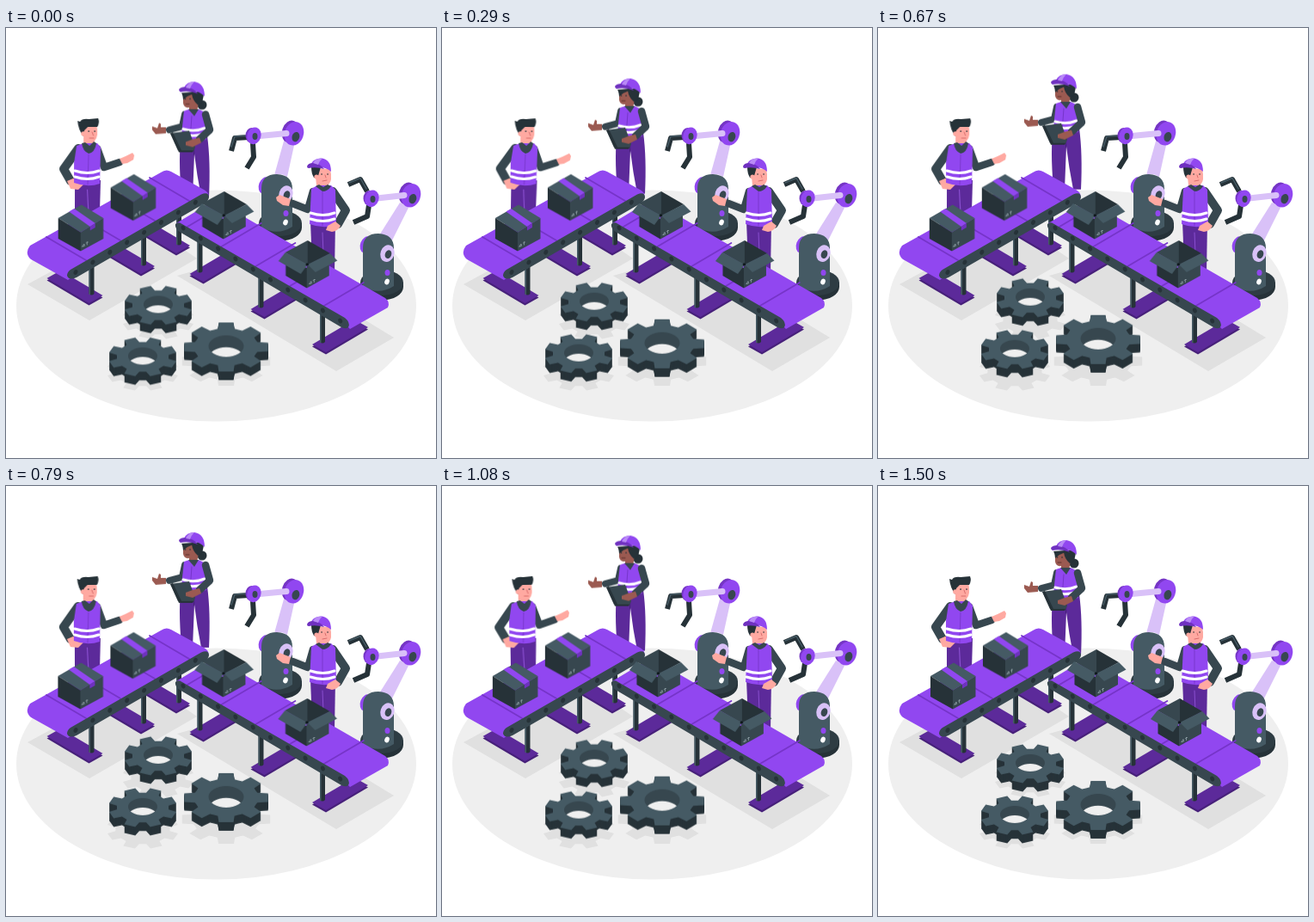
Write an HTML page that moves like this. It is 500x500 px and loops after 1.54 s.

```html
<!DOCTYPE html>
<html lang="en">
<head>
<meta charset="utf-8">
<title>Assembly line</title>
<style>
  html, body { margin: 0; width: 100%; height: 100%; overflow: hidden; background: #fff; }
  svg { display: block; width: 100vw; height: 100vh; }
  .p { fill: #9147f0 } .dp { fill: #5c2a9a } .lp { fill: #d9c1f8 }
  .g { fill: #455a64 } .mg { fill: #37474f } .dg { fill: #263238 }
  .w { fill: #fff } .sh { fill: #e0e0e0 } .skin { fill: #ffa9a1 } .brown { fill: #9b5a51 }
  .line { fill: none; stroke-linecap: round; stroke-linejoin: round }
  .sleeve { stroke: #37474f; stroke-width: 10 }
  .claw { fill: none; stroke: #263238; stroke-width: 6; stroke-linejoin: round }
  .man { transform-origin: 95px 212px }
</style>
</head>
<body>
<svg id="stage" viewBox="0 0 500 500">
  <ellipse cx="244.500" cy="323" rx="232.500" ry="134.500" fill="#efefef"/>
  <path class="sh" d="M25 298L97 340L222 268L160 225ZM199 288L384 399L451 360L290 262Z"/>
  <g id="shadows"></g>

  <!-- supervisor with clipboard -->
  <g class="float">
    <path class="dp" d="M204 126L234 126Q238 155 236 197L227 197Q222 172 219 147L217 197L204 197Q200 148 204 126Z"/>
    <path class="line" d="M219 133L218.500 148" stroke="#47207a" stroke-width="1"/>
    <circle class="dg" cx="228" cy="90" r="5.500"/>
    <path class="dg" d="M204 76L230 74Q230 87 224 92L211 90Z"/>
    <path class="brown" d="M206 77L221 78L224 87L222 98L213 99L213 93Q207 94 206 88Z"/>
    <path class="dg" d="M216 77L229 74L227 88L223 90Q217 85 216 77ZM205 76L218 77L211 80L206 84Z"/>
    <path class="p" d="M207 70Q210 63 219 63Q231 65 231 80Q225 74 218 74Z"/>
    <path d="M201 72Q203 69 209 69Q218 70 223 77Q213 73 203 75Q201 74 201 72Z" fill="#6f31c0"/>
    <path d="M214 64L219 63Q215 67 214 71L209 70Q210 67 214 64Z" fill="#b98af7"/>
    <path class="line" d="M208.500 83h.1M214 83h.1" stroke="#263238" stroke-width="1.600"/>
    <path class="line" d="M209 89L213 89" stroke="#5f302c" stroke-width="1"/>
    <path class="line sleeve" d="M208 101L205 115L190 119" style="stroke-width:8"/>
    <path class="p" d="M207 97L213 95L224 95L232 99L233 130Q219 136 204 131L205 115Z"/>
    <path class="mg" d="M212 95L224 95L219 103Z"/>
    <path class="line" d="M216 103L214 131" stroke="#6f31c0" stroke-width=".8"/>
    <path class="line" d="M206 118Q219 122 231 117M206 124Q219 128 231 123" stroke="#fff" stroke-width="3"/>
    <path class="mg" d="M191 123L213 120L220 139L218 144L200 143Z"/>
    <path class="dg" d="M191 123L194 122L204 143L218 143L217 145L201 145Z"/>
    <path class="line sleeve" d="M232 101L237 119L225 130" style="stroke-width:8.500"/>
    <path class="brown" d="M225 128L227 134L217 139L209 137L209 133L217 130Z"/>
    <path class="brown" d="M186 116L186 123L174 124L170 119L170 115L176 117L178 111L180 112L180 116Z"/>
  </g>

  <!-- worker by the closed boxes -->
  <g class="man">
    <path class="dp" d="M80 177L110 177L109 214L96 225L80 216Z"/>
    <path class="line" d="M94.500 188L96 216" stroke="#8a4fd0" stroke-width="1.200"/>
    <path class="line sleeve" d="M84 140L67 164L75 178"/>
    <path class="line sleeve" d="M106 140L114 162L132 156" style="stroke-width:8.500"/>
    <path class="skin" d="M71 178L78 175Q86 177 90 182L84 188L75 187Z"/>
    <path class="skin" d="M132 152L139 149L147 145L149 148L148 153L141 157L135 158Z"/>
    <path class="skin" d="M90 114L105 112Q108 126 103 131L102 138L94 141L90 134Z"/>
    <path class="p" d="M82 137L90 134L106 134L110 139L109 181Q95 186 79 180L79 157Z"/>
    <path class="mg" d="M88 134L92 133L97 137L102 132L105 134Q103 145 96 146Q89 143 88 134Z"/>
    <path class="line" d="M96 147L95 182" stroke="#7535c5" stroke-width=".8"/>
    <path class="line" d="M80 166Q95 171 108 166M80 173Q95 178 108 173" stroke="#fff" stroke-width="3"/>
    <path class="dg" d="M83 108L86 109Q88 105 96 106L107 105Q109 110 106 115L95 115L91 119L90 126Q84 119 83 108Z"/>
    <circle class="skin" cx="90" cy="123" r="2.800"/>
    <path class="line" d="M96 120h.1M103 120h.1" stroke="#263238" stroke-width="1.700"/>
    <path class="line" d="M100 121L101.500 125M97 128L102 128" stroke="#d96e6d" stroke-width="1"/>
  </g>

  <defs>
    <g id="base">
      <path class="dg" d="M294 227V232A25 15.500 0 0 0 344 232V227Z"/>
      <ellipse cx="319" cy="227" rx="25" ry="15" fill="#2e3c43"/>
      <ellipse class="p" cx="301" cy="183" rx="7" ry="10" transform="rotate(20 301 183)"/>
      <path class="g" d="M297 187Q297 170 315 170Q333 171 333 187V231Q316 242 297 232Z"/>
      <ellipse class="lp" cx="325.500" cy="193" rx="8" ry="10" transform="rotate(20 325 193)"/>
      <ellipse class="mg" cx="326.500" cy="194" rx="3.700" ry="5" transform="rotate(20 326 194)"/>
      <ellipse class="p" cx="325.500" cy="215.500" rx="3" ry="3.600"/>
      <ellipse class="w" cx="325" cy="226" rx="2.700" ry="3.500" transform="rotate(20 325 226)"/>
    </g>
    <g id="elbow">
      <ellipse cx="-4" cy="-1" rx="9.500" ry="13" transform="rotate(18)" fill="#7535c5"/>
      <ellipse class="p" cx="1" rx="11" ry="14" transform="rotate(18)"/>
      <ellipse class="mg" cx="4" cy="3" rx="4.300" ry="5.800" transform="rotate(18)"/>
    </g>
    <g id="wrist">
      <ellipse cx="-2" rx="7" ry="9" fill="#7535c5"/>
      <ellipse class="p" cx="1" rx="8" ry="10" transform="rotate(18)"/>
      <ellipse class="mg" cx="2" cy="1" rx="3" ry="4"/>
    </g>
    <g id="sealed">
      <path class="g" d="M88 205.500L113.500 221L87 237.500L61 221Z"/>
      <path class="dg" d="M61 221L87 237.500V259.500L61 245Z"/>
      <path class="mg" d="M87 237.500L113.500 221V245L87 259.500Z"/>
      <path class="p" d="M73.500 213.500L79.500 210L104 227L98 231Z"/>
      <path d="M98 231L104 227V232L98 235.500Z" fill="#6f31c0"/>
      <use href="#marks" x="89" y="255"/>
    </g>
    <g id="open">
      <path class="dg" d="M228.500 212L253 222V245.500L228.500 231Z"/>
      <path class="mg" d="M253 220L279 211V231L253 245.500Z"/>
      <path class="mg" d="M228 204L254 190L254 219Z"/>
      <path class="dg" d="M254 190L280 205L254 219Z"/>
      <path class="g" d="M228 204L254 218L246 229L220 214Z"/>
      <path class="g" d="M280 205L254 218L263 227L288.500 213.500Z"/>
      <circle cx="253.500" cy="218" r="1.800" fill="#111a1e"/>
      <use href="#marks" x="256" y="241.500"/>
    </g>
    <path id="marks" class="line" d="M0 -1L2 -4L2.500 -2ZM5.500 -3V-6M4.500 -5L5.500 -6L6.500 -6" stroke="#9fb0b7" stroke-width=".7"/>
  </defs>

  <!-- robot arms -->
  <g>
    <path class="lp" d="M312 171L324 128L336 132L327 173Q320 168 312 171Z"/>
    <use href="#base"/>
    <use href="#elbow" x="334" y="122.500"/>
    <path class="line" d="M290 126L326 122.500" stroke="#d9c1f8" stroke-width="7"/>
    <path class="claw" d="M283 127L266 128L262 143M287 134L288 150L280 163"/>
    <path class="line" d="M282 125L266 126L262 138" stroke="#455a64" stroke-width="1.500"/>
    <use href="#wrist" x="287.500" y="125"/>
  </g>
  <g>
    <path class="lp" d="M434 241L458 203L469 207L449 247Z"/>
    <use href="#base" x="118" y="69"/>
    <use href="#elbow" x="470" y="194.500"/>
    <path class="line" d="M427 198.500L463 194.500" stroke="#d9c1f8" stroke-width="7"/>
    <path class="claw" d="M420 190L412 176L398 182M422 206L420 219L404 226"/>
    <path class="line" d="M419 187L412 174.500L399 180" stroke="#455a64" stroke-width="1.500"/>
    <use href="#wrist" x="424.500" y="198"/>
  </g>

  <!-- worker by the open boxes -->
  <g>
    <path class="dp" d="M354 225L383 225L382 285L356 275Z"/>
    <path class="line" d="M368 238L369 262" stroke="#8a4fd0" stroke-width="1"/>
    <path class="line sleeve" d="M357 190L351 211L333 204" style="stroke-width:8.500"/>
    <path class="line sleeve" d="M380 190L395 212L386 228"/>
    <path class="skin" d="M331 199L329 207L322 206L315 201L314 197L318 194Z"/>
    <path class="skin" d="M359 163L377 164Q380 178 375 182L374 188L366 189L361 183Z"/>
    <path class="p" d="M355 187L362 183L378 183L383 188L384 229Q369 234 353 228L354 207Z"/>
    <path class="mg" d="M360 184L364 182L369 185L374 182L378 184Q374 190 368 190Z"/>
    <path class="line" d="M368 190L368 230" stroke="#7535c5" stroke-width=".8"/>
    <path class="line" d="M354 215Q369 220 382 215M354 222Q369 227 382 222" stroke="#fff" stroke-width="3"/>
    <path class="skin" d="M383 225L389 230Q386 236 379 237L372 235L374 230Z"/>
    <path class="dg" d="M355 162L366 162L362 175L358 174Q355 169 355 162Z"/>
    <path class="p" d="M354 160Q356 152 366 151.500Q378 152 378 167Q372 162 365 162Z"/>
    <path d="M350 161Q351 157 357 157Q366 158 370 164Q360 161 352 163Q350 163 350 161Z" fill="#6f31c0"/>
    <path d="M362 152L368 151.500Q364 155 363 159L357 157Q358 154 362 152Z" fill="#b98af7"/>
    <circle class="skin" cx="361" cy="173" r="2.600"/>
    <path class="line" d="M367 170h.1M374 170h.1" stroke="#263238" stroke-width="1.600"/>
    <path class="line" d="M371 171L372 174M368 178L373 177" stroke="#d96e6d" stroke-width="1"/>
  </g>

  <g id="leftLegs"></g>
  <path class="p" d="M28 253L180 168Q186 163.500 192 167L231 188.500Q237 192 235 198L76 290L72 293L29 269Q21 262 28 253Z"/>
  <g id="leftSeams"></g>
  <path class="mg" d="M75 281L227 193.500Q236 190 236 197Q235 202 230 204.500L82 290Q73 294 71 288Q71 284 75 281Z"/>
  <g id="leftRollers"></g>
  <use class="shake" href="#sealed"/>
  <g transform="translate(61 -35.500)"><use class="shake" href="#sealed"/></g>

  <g id="rightLegs"></g>
  <path class="p" d="M198 227L243 200L441 314Q447 319 444 325L400 350L392 342Z"/>
  <g id="rightSeams"></g>
  <path class="mg" d="M204 227.500L394 337Q400 342 398.500 347Q397 351 390 348L201 236.500Q196 232 197 228Q200 225 204 227.500Z"/>
  <g id="rightRollers"></g>
  <use class="shake" href="#open"/>
  <g transform="translate(97 57)"><use class="shake" href="#open"/></g>

  <g id="gears"></g>
</svg>
<script>
const LOOP = 1540, LEAD = 45;
const byId = id => document.getElementById(id);
const repeat = (n, fn) => Array.from({ length: n }, (_, i) => fn(i)).join('');
const fill = (id, html) => { byId(id).innerHTML = html; };

// Belt seams and rollers
const seams = (n, x, y, dx, dy, w, h) => repeat(n, i =>
  `<path class="line" d="M${x + i * dx} ${y + i * dy}l${w} ${h}" stroke="#7634c9" stroke-width="1.800"/>`);
const rollers = (n, x, y, dx, dy, tilt) => repeat(n, i => {
  const cx = x + i * dx, cy = y + i * dy;
  return `<ellipse class="dg" cx="${cx}" cy="${cy}" rx="2.300" ry="3" transform="rotate(${tilt} ${cx} ${cy})"/>`;
});
fill('leftSeams', seams(4, 93, 270, 40, -23, -46, -27));
fill('leftRollers', rollers(8, 81, 284, 19.9, -11.6, 25));
fill('rightSeams', seams(5, 211, 231, 39.7, 23, 46, -27));
fill('rightRollers', rollers(10, 206, 232.5, 20.3, 12, -25));

// Posts standing on foot plates
const leg = (x, y, plate, top) => `
  <path fill="#47207a" d="${plate}" transform="translate(${x} ${y + 2.5})"/>
  <path class="dp" d="${plate}" transform="translate(${x} ${y})"/>
  <path class="dg" d="M${x - 3} ${y + top}h6v${-top - 4}q-3 3 -6 0Z"/>
  <path class="g" d="M${x - 3} ${y + top}h1.500v${-top - 3}h-1.500Z"/>`;
const plateL = 'M-52 -22L-3 7L13 -2L-36 -31Z';
const plateR = 'M-12 -1L4 8L53 -21L37 -30Z';
fill('leftLegs', leg(201, 255, plateL, -40) + leg(160, 279, plateL, -40) + leg(99.5, 313, plateL, -40));
fill('rightLegs', leg(225.5, 287, plateR, -40) + leg(296.5, 328, plateR, -40) + leg(368, 369, plateR, -40));

// Gears: a toothed outline squashed to the floor plane and extruded down
function outline(rx, ry, turn) {
  const shape = [[.76, -15], [1, -10], [1, 10], [.76, 15], [.75, 22.5]];
  const pts = [];
  for (let k = 0; k < 8; k++)
    for (const [r, a] of shape) {
      const t = (a + turn + k * 45) * Math.PI / 180;
      pts.push((rx * r * Math.cos(t)).toFixed(1) + ' ' + (ry * r * Math.sin(t)).toFixed(1));
    }
  return 'M' + pts.join('L') + 'Z';
}
const ring = (rx, ry) => `M${-rx} 0a${rx} ${ry} 0 1 0 ${2 * rx} 0a${rx} ${ry} 0 1 0 ${-2 * rx} 0Z`;
const gears = [[177, 323, 40, 23, 17, 10, 22.5], [159, 383, 40, 23, 17, 10, 22.5], [256, 371.5, 49.5, 29, 20.5, 12.5, 0]];
fill('shadows', gears.map(([x, y, rx, ry, , , turn]) =>
  `<path class="sh" d="${outline(rx * 1.05, ry, turn)}" transform="translate(${x} ${y + 16})"/>`).join(''));
fill('gears', gears.map(([x, y, rx, ry, hx, hy, turn], n) => {
  const body = outline(rx, ry, turn), hole = ring(hx, hy), depth = 10;
  return `<g class="float"><g transform="translate(${x} ${y})">
    <clipPath id="hole${n}"><path d="${hole}"/></clipPath>
    ${repeat(depth, i => `<path class="dg" d="${body}" transform="translate(0 ${depth - i})"/>`)}
    <path class="g" d="${body}"/>
    <path class="mg" d="${hole}" transform="translate(0 -1)"/>
    <g transform="translate(0 -1)" clip-path="url(#hole${n})">
      <path d="${hole}" fill="#efefef" transform="translate(0 ${hy * 1.1})"/></g>
  </g></g>`;
}).join(''));

// Motion
const play = (sel, frames) => document.querySelectorAll(sel).forEach(el =>
  el.animate(frames, { duration: LOOP, delay: -LEAD, iterations: Infinity, easing: 'linear' }));
const shift = (x, y, offset) => ({ transform: `translate(${x}px, ${y}px)`, offset });
const lean = (deg, offset) => ({ transform: `rotate(${deg}deg)`, offset });

play('.float', [shift(0, 0, 0), shift(0, -10, .5), shift(0, 0, 1)]);
play('.man', [lean(0, 0), lean(1, .25), lean(-1, .75), lean(0, 1)]);
play('.shake', [0, -1, 2, -4, 4, -4, 4, -4, 2, -1, 0].map((x, i) => shift(x, 0, i / 10)));
</script>
</body>
</html>
```
